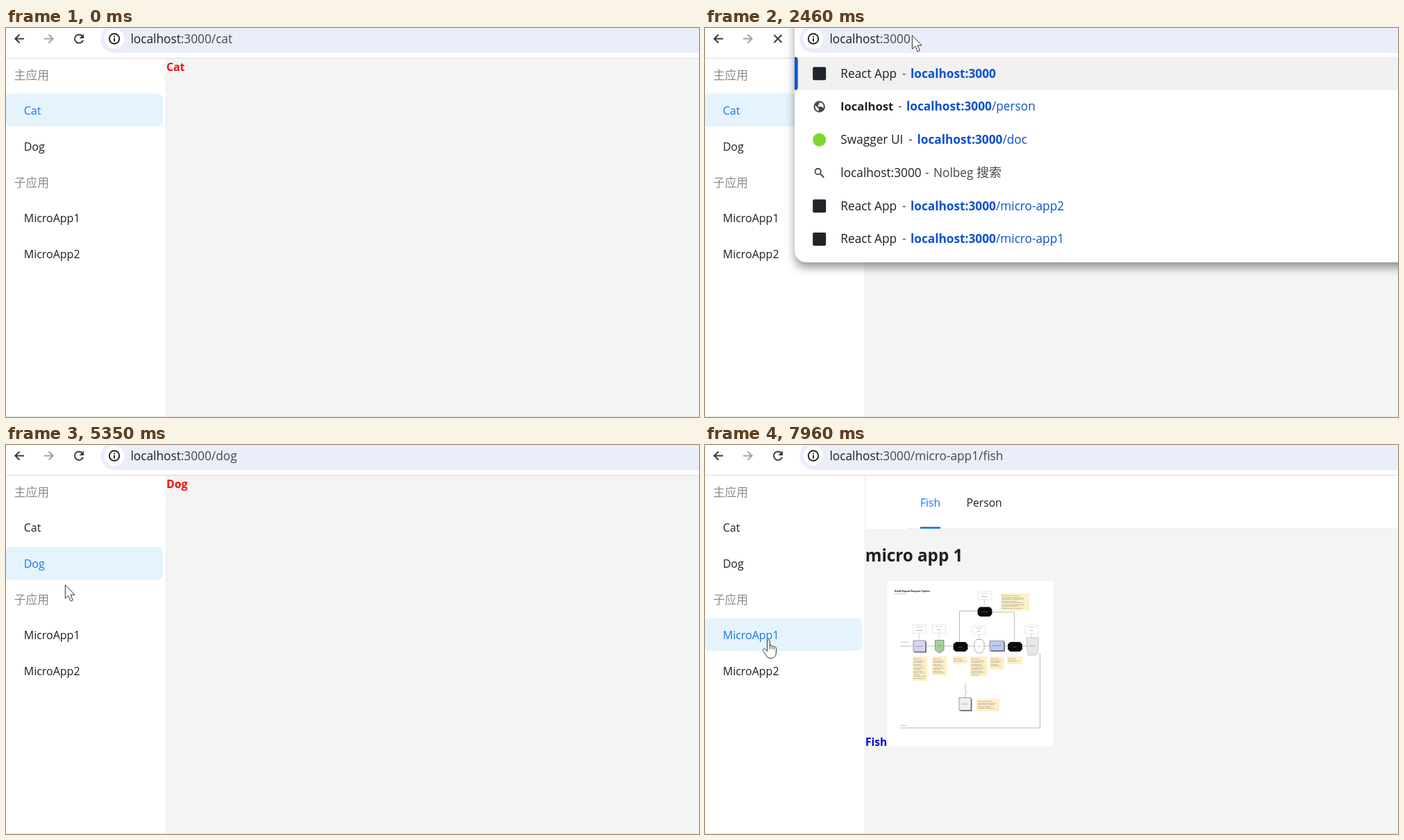
An HTML page that plays this animation: 998 by 561 pixels, repeating every 8000 ms.

```html
<!DOCTYPE html>
<html lang="en">
<head>
<meta charset="utf-8">
<title>Micro app navigation</title>
<style>
  html, body { margin: 0; width: 100%; height: 100%; overflow: hidden; background: #fff; }
  svg { position: absolute; left: 0; top: 0; display: block; }
  text { font-family: "Open Sans", "Noto Sans", "Noto Sans CJK SC", "Noto Sans CJK", sans-serif; white-space: pre; }
  .url { font-size: 17.25px; }
  .menu { font-size: 16px; }
  .cjk { font-family: "Noto Sans CJK SC", "Noto Sans CJK", sans-serif; }
  .label { font-size: 16.8px; fill: #8a8a8a; }
  .bold { font-weight: 700; }
  .link { fill: #0b50d0; }
  .dim { fill: #474747; }
  .tiny { font-size: 1.9px; fill: #333; }
</style>
</head>
<body>
<svg id="stage" width="998" height="561" viewBox="0 0 998 561"></svg>
<script>
const LOOP = 8000;
const WHITE = [255, 255, 255], HOVER = [237, 241, 244], SELECTED = [229, 243, 253];
const INK = [31, 31, 31], BLUE = [26, 119, 234];

const items = [
  { name: 'Cat', y: 94.5 },
  { name: 'Dog', y: 147 },
  { name: 'MicroApp1', y: 249.5 },
  { name: 'MicroApp2', y: 302 },
];

// ---------- markup helpers ----------
const rect = (x, y, w, h, fill, extra = '') =>
  `<rect x="${x}" y="${y}" width="${w}" height="${h}" fill="${fill}" ${extra}/>`;
const path = (d, stroke, width, extra = 'fill="none"') =>
  `<path d="${d}" stroke="${stroke}" stroke-width="${width}" ${extra}/>`;
const text = (x, y, str, cls, extra = '') =>
  `<text x="${x}" y="${y}" class="${cls}" ${extra}>${str}</text>`;
const group = (id, body, extra = '') => `<g id="${id}" ${extra}>${body}</g>`;

// ---------- browser toolbar ----------
const toolbar = () =>
  path('M26 15.5H14M19.5 9.5L13.3 15.5L19.5 21.5', '#3c3c3c', 2) +
  path('M55 15.5H67M61.5 9.5L67.7 15.5L61.5 21.5', '#a3a3a3', 2) +
  group('reload', path('M110.2 12A6.2 6.2 0 1 0 111 17.6', '#3c3c3c', 2) +
    '<path d="M112 8.5V15H105.5Z" fill="#3c3c3c"/>') +
  group('stop', path('M99.5 10L110.5 21M110.5 10L99.5 21', '#3c3c3c', 2.1));

const addressBar = () =>
  rect(136, -5, 900, 41, '#eaeef8', 'id="bar" rx="20.5"') +
  '<circle cx="156" cy="15.5" r="14.3" fill="#fff"/>' +
  '<circle cx="156" cy="15.5" r="7.2" fill="none" stroke="#1f1f1f" stroke-width="1.9"/>' +
  path('M156 14.6V19.4M156 11.4V13.2', '#1f1f1f', 1.9) +
  text(179.5, 21.6, '<tspan fill="#1f1f1f">localhost</tspan><tspan class="dim" id="rest"></tspan>', 'url') +
  group('picked', rect(0, 3, 0, 24.5, '#0b57d0', 'id="pickBox"') +
    text(179.5, 21.6, 'localhost:3000/cat', 'url', 'fill="#fff" clip-path="url(#pickClip)"'));

// ---------- suggestion list ----------
const suggestions = [
  ['square', 'React App', 284, 296, ''],
  ['globe', '<tspan class="bold" font-size="16.7">localhost</tspan>', 278, 290, '/person'],
  ['round', 'Swagger UI', 293, 305.5, '/doc'],
  ['search', 'localhost:3000', 317, 0, ''],
  ['square', 'React App', 284, 296, '/micro-app2'],
  ['square', 'React App', 284, 296, '/micro-app1'],
];
const icons = {
  square: rect(-9.5, -9.5, 19, 19, '#20242b', 'rx="2"'),
  round: '<circle r="9.5" fill="#7fd62f"/>',
  globe: '<circle r="8.2" fill="#474747"/><path d="M-6-2L-1 3V6.3C-4 6-6.5 3-6-2ZM-1-5.5L3-6C6-4 6.5-1 6 2L3 0H-2V-3H0Z" fill="#fff"/>',
  search: '<circle cx="-2" cy="-2" r="4.2" fill="none" stroke="#474747" stroke-width="1.8"/>' +
    path('M1 1L6.5 6.5', '#474747', 2),
};
const suggestionRow = ([icon, title, dashX, linkX, tail], i) => {
  const mid = 65.7 + i * 47.75;
  const link = linkX
    ? `<tspan x="${linkX}" class="link bold">localhost:3000</tspan><tspan class="link">${tail}</tspan>`
    : '<tspan x="329" class="dim">Nolbeg </tspan><tspan class="dim cjk" font-size="18">搜索</tspan>';
  return `<g transform="translate(164.7 ${mid})">${icons[icon]}</g>` +
    text(195.3, mid + 6, `<tspan fill="#1f1f1f">${title}</tspan><tspan x="${dashX}" class="dim">-</tspan>${link}`, 'url');
};
const dropdown = () =>
  rect(129, -30, 920, 367.7, '#fff', 'rx="17" filter="url(#shadow)"') +
  rect(129, 41.7, 869, 47.7, '#f1f1f1') +
  path('M129 41.7H130Q133.7 41.7 133.7 45.5V85.5Q133.7 89.4 130 89.4H129Z', 'none', 0, 'fill="#0b57d0"') +
  suggestions.map(suggestionRow).join('');

// ---------- pipeline diagram ----------
const filler = 'Runs in order and may change the request before it is passed on to the next step of the chain ';
const snippet = (start, length) => (filler + filler).substr(start, length).trim();

function note(x, y, w, h) {
  let out = rect(x, y, w, h, '#fdefc8');
  for (let k = 0; k * 2.5 < h - 6; k++)
    out += text(x + 1.5, y + 4 + k * 2.5, snippet(k * 17 % 80, Math.floor((w - 3) * (k % 3 ? 0.95 : 0.7))), 'tiny');
  return out;
}
const centred = (x, y, str, fill = '#222') =>
  text(x, y, str, 'tiny', `text-anchor="middle" style="fill:${fill}"`);
const card = (x, y, label) =>
  rect(x - 9.5, y, 19, 12, '#fff', 'stroke="#d0d0d0" stroke-width=".5"') +
  path(`M${x - 5} ${y + 3}h10M${x} ${y + 12}v9`, '#aaa', 0.5) + centred(x, y + 8, label);
const capsule = (x, y, label) =>
  path(`M${x - 7} ${y - 6.5}h14l3 3v7l-3 3h-14l-3-3v-7Z`, '#0b0b0b', 0.8, 'fill="#0b0b0b" stroke-linejoin="round"') +
  centred(x, y + 0.7, label, '#ccc');
const stack = (x, y, w, h, fill, label) =>
  rect(x + 1.5, y + 1.5, w, h, '#777') + rect(x, y, w, h, fill, 'stroke="#666" stroke-width=".6"') +
  centred(x + w / 2, y + h / 2 + 0.7, label);

const diagram = () =>
  rect(262.5, 196, 239, 238.5, '#fff') +
  text(273, 211.5, 'NestJS Request/Response Pipeline', 'bold', 'font-size="3" fill="#111"') +
  text(273, 215.3, 'Built for NestJS v9.2', 'tiny') +
  path('M281 290H472M482.5 300V408H281M366.5 288V239.5H394M412 241H445.5V288M375 344V366', '#8b8b8b', 0.6) +
  text(282, 284.5, 'Start request', 'tiny') + text(282, 404.5, 'Response', 'tiny') + text(377.5, 357, 'DI', 'tiny') +
  card(402.5, 211, 'Interceptor') + card(308.5, 259.5, 'Middleware') + card(337, 259, 'Guard') +
  card(394.5, 261, 'Pipe') + card(470.5, 260, 'Filter') +
  capsule(403, 240.5, 'Interceptor') + capsule(368, 291, 'Before') + capsule(446.5, 291, 'After') +
  stack(300, 282, 17.5, 16, '#d9d4f0', 'Middleware') +
  path('M331.5 281.5H344V296L338 300L331.5 296Z', '#5c7c59', 0.7, 'fill="#a8cf9f"') + centred(338, 290, 'Guard') +
  path('M391 280.5H399L402 285V295L398 300H392L388 295V285Z', '#777', 0.6, 'fill="#fff"') + centred(395, 291, 'Pipe') +
  stack(410, 282.5, 20.5, 14, '#b9cbef', 'Route handler') +
  path('M463 278H480.5L479 300L476 303H465Z', '#aaa', 0.6, 'fill="#e8e9e6"') + centred(471.5, 290, 'Exception') +
  stack(366, 364.5, 17, 18, '#eef0ea', 'Provider') +
  [[426, 214, 41, 25], [299, 305, 21, 35], [327, 305, 21.5, 27], [357, 305, 20.5, 10.5], [382, 305, 24.5, 29],
    [410, 305, 21, 18.5], [435, 305, 21.5, 11], [391, 366, 33, 18]].map(n => note(...n)).join('');

const microPage = () =>
  rect(231, 44, 767, 77, '#fff') + rect(292, 120, 706, 1, '#ececec') +
  text(310, 89, 'Fish', '', 'font-size="15.7" fill="#1677ff"') +
  text(376.5, 89, 'Person', '', 'font-size="15.7" fill="#1f1f1f"') +
  rect(310, 118, 29, 2.7, '#1677ff') +
  text(230.7, 168, 'micro app 1', 'bold', 'font-size="24.2" fill="#1f1f1f"') +
  text(231, 434.3, 'Fish', 'bold', 'font-size="15.5" fill="#0000ee"');

// ---------- pointer ----------
const pointer = () =>
  '<circle id="glow" r="14" fill="#f8f43c" opacity=".75"/>' +
  group('arrow', path('M0 0V19.5L4.5 15.5L7.7 23.3L11 22L7.7 14.3H13.8Z', '#333', 1, 'fill="#fff" stroke-linejoin="round"')) +
  group('beam', path('M-3.5-10H-1L0-9L1-10H3.5M0-9V9M-3.5 10H-1L0 9L1 10H3.5', '#111', 1.2)) +
  group('hand', path('M-2 2C-2-.7 2-.7 2 2V9C2.5 7.3 5 7.6 5 9.7C5.6 8.3 8 8.6 8 10.7C8.7 9.5 11 9.9 11 12.2V17C11 23 8.5 26.5 3.5 26.5C-1 26.5-3 24-4.5 21L-8 15.5C-8.6 13-6 12-4.2 14L-2 16.5Z',
    '#333', 1, 'fill="#fff" stroke-linejoin="round"') + path('M2 9V13.5M5 10V13.5M8 11V14', '#333', 0.9));

document.getElementById('stage').innerHTML =
  `<defs><filter id="shadow" x="-10%" y="-10%" width="120%" height="125%">
    <feDropShadow dx="0" dy="8" stdDeviation="6.5" flood-opacity=".4"/></filter>
    <clipPath id="pickClip">${rect(0, 3, 0, 24.5, '#000', 'id="pickMask"')}</clipPath></defs>` +
  rect(0, 0, 998, 561, '#fff') + rect(231, 44, 767, 517, '#f4f4f4') +
  rect(230, 44, 1, 517, '#ececec') + rect(0, 43, 998, 1, '#dcdcdc') +
  text(11.7, 74, '主应用', 'label cjk') + text(11.7, 229, '子应用', 'label cjk') +
  items.map((it, i) => rect(-2, it.y, 228, 47.5, '#fff', `id="back${i}" rx="8"`) +
    text(25.7, it.y + 30.3, it.name, 'menu', `id="name${i}"`)).join('') +
  text(231, 62, '', 'bold', 'id="content" font-size="15.8" fill="#f80d0d"') +
  group('micro', microPage()) + group('picture', diagram()) +
  rect(0, 560, 998, 1, '#e4e4e4') +
  toolbar() + group('dropdown', dropdown()) + addressBar() + group('pointer', pointer());

// ---------- timeline ----------
const $ = id => document.getElementById(id);
const show = (id, on) => $(id).setAttribute('display', on ? 'inline' : 'none');
const set = (id, attrs) => Object.entries(attrs).forEach(([k, v]) => $(id).setAttribute(k, v));
const smooth = p => p * p * (3 - 2 * p);
const mix = (a, b, p) => a.map((v, i) => v + (b[i] - v) * p);
const rgb = c => `rgb(${c.map(Math.round)})`;
const within = (t, a, b) => t >= a && t < b;
const latest = (steps, t) => steps.reduce((v, [at, next]) => t >= at ? next : v, steps[0][1]);

const route = [[110, 998, 488], [860, 357, 14], [930, 357, 14], [1400, 297, 14], [1540, 297, 14], [1730, 298.4, 10.7],
  [3400, 298.4, 10.7], [3960, 86, 168], [4200, 83.5, 160], [5100, 83.5, 160], [5480, 86, 217], [5820, 84.5, 125],
  [6090, 84.5, 125], [6770, 88, 282], [7920, 88, 282], [7960, 91.5, 281]];
const clicks = [[870, 1560], [4420, 4620], [5800, 5890], [7030, 7160]];
const paths = [[0, '/cat'], [2260, ''], [2990, '/cat'], [4640, '/dog'], [5890, '/cat'], [7100, '/micro-app1'], [7240, '/micro-app1/fish']];
const contents = [[0, 'Cat'], [2990, ''], [3060, 'Cat'], [4640, 'Dog'], [5890, 'Cat'], [7100, '']];
const selections = [[0, 0], [4640, 1], [5890, 0], [7100, 2]];
const charEdges = [295, 302, 310.5, 320, 327];

function pointerAt(t) {
  const i = route.findIndex(([at]) => at > t);
  if (i === 0) return route[0].slice(1);
  if (i < 0) return route[route.length - 1].slice(1);
  const [t0, ...a] = route[i - 1], [t1, ...b] = route[i];
  return mix(a, b, smooth((t - t0) / (t1 - t0)));
}
function hoveredAt(t) {
  const [x, y] = pointerAt(t);
  return items.findIndex(it => x < 226 && y >= it.y && y < it.y + 47.5);
}
// Share of the recent past in which a condition held: a fade without stored state.
function recent(t, span, test) {
  let hits = 0;
  for (let k = 0; k < 20; k++) if (test(t - span * (k + 0.5) / 20)) hits++;
  return smooth(hits / 20);
}

function render(t) {
  items.forEach((it, i) => {
    const chosen = recent(t, 300, s => latest(selections, s) === i);
    const hover = recent(t, 200, s => hoveredAt(s) === i);
    set('back' + i, { fill: rgb(mix(mix(WHITE, HOVER, hover), SELECTED, chosen)) });
    set('name' + i, { fill: rgb(mix(INK, BLUE, chosen)) });
  });

  $('rest').textContent = ':3000' + latest(paths, t);
  $('content').textContent = latest(contents, t);
  show('micro', t >= 7310);
  show('picture', t >= 7500);

  const focused = within(t, 870, 2400);
  set('bar', {
    fill: focused ? '#fff' : '#eaeef8',
    stroke: within(t, 870, 2260) ? '#0b57d0' : 'none',
    'stroke-width': 2.4,
  });
  const loading = within(t, 2400, 3060);
  show('stop', loading);
  show('reload', !loading);
  show('dropdown', within(t, 2260, 2540));

  const [x, y] = pointerAt(t);
  const left = charEdges.find(e => e >= x - 4) || 327;
  show('picked', within(t, 930, 2260));
  ['pickBox', 'pickMask'].forEach(id => set(id, { x: left, width: 327 - left }));

  const beam = within(t, 800, 1640);
  const hand = !beam && hoveredAt(t) >= 0;
  show('pointer', t >= 110);
  set('pointer', { transform: `translate(${x.toFixed(2)} ${y.toFixed(2)})` });
  show('glow', clicks.some(([a, b]) => within(t, a, b)));
  show('beam', beam);
  show('hand', hand);
  show('arrow', !beam && !hand);
}

const start = performance.now();
function tick() {
  render((performance.now() - start) % LOOP);
  requestAnimationFrame(tick);
}
tick();
</script>
</body>
</html>
```
